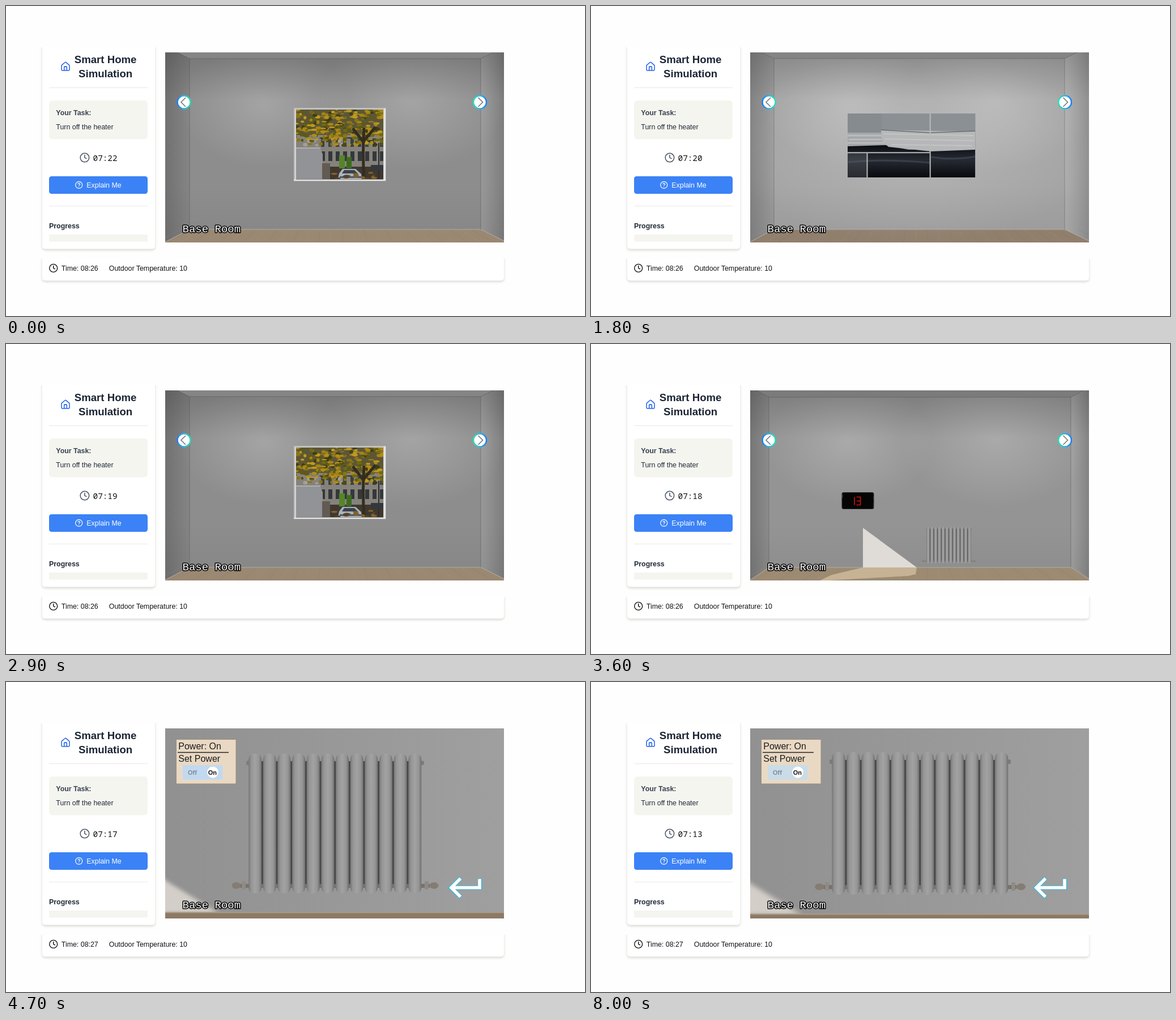
An HTML page that plays this animation: 1022 px wide and 548 px high, repeating every 8500 ms.

```html
<!DOCTYPE html>
<html lang="en">
<head>
<meta charset="utf-8">
<title>Smart Home Simulation</title>
<style>
html, body { margin: 0; height: 100%; overflow: hidden; background: #fefefe; }
#stage { display: block; width: 100vw; height: 100vh; font: 12.4px "Liberation Sans", Arial, sans-serif; }
.b { font-weight: bold; }
.mono { font-family: "Noto Sans Mono", monospace; font-size: 14.3px; }
.card { fill: #fff; filter: drop-shadow(0 2px 2px rgba(70, 65, 30, .22)); }
.soft { fill: #f5f5f0; }
.icon { fill: none; stroke-width: 2; stroke-linecap: round; stroke-linejoin: round; }
.line { fill: none; }
.label { font: 19px "Liberation Mono", "Courier New", monospace; fill: #fff; stroke: #000; stroke-width: 3px; stroke-linejoin: round; paint-order: stroke; }
.panel { font-size: 16px; fill: #1b1b1b; }
.tiny { font-size: 11px; font-weight: bold; }
</style>
</head>
<body>
<svg id="stage" viewBox="0 0 1022 548" preserveAspectRatio="none">
  <defs>
    <linearGradient id="ring"><stop stop-color="#1f7df0"/><stop offset=".5" stop-color="#2cb8e8"/><stop offset="1" stop-color="#27e0b0"/></linearGradient>
    <linearGradient id="fin">
      <stop stop-color="#777"/><stop offset=".2" stop-color="#959595"/><stop offset=".5" stop-color="#a2a2a2"/>
      <stop offset=".8" stop-color="#959595"/><stop offset="1" stop-color="#707070"/>
    </linearGradient>
    <linearGradient id="leftShade"><stop stop-color="#000" stop-opacity=".2"/><stop offset="1" stop-color="#000" stop-opacity=".06"/></linearGradient>
    <linearGradient id="rightShade"><stop stop-color="#fff" stop-opacity=".1"/><stop offset="1" stop-color="#000" stop-opacity=".12"/></linearGradient>
    <linearGradient id="topShade" x2="0" y2="1"><stop stop-color="#000" stop-opacity=".16"/><stop offset=".25" stop-color="#000" stop-opacity="0"/><stop offset=".7" stop-color="#000" stop-opacity="0"/><stop offset="1" stop-color="#000" stop-opacity=".05"/></linearGradient>
    <linearGradient id="closeWall"><stop stop-color="#909090"/><stop offset="1" stop-color="#a0a0a0"/></linearGradient>
    <linearGradient id="night" x2="0" y2="1"><stop stop-color="#0b0d12"/><stop offset=".45" stop-color="#262b33"/><stop offset="1" stop-color="#08090d"/></linearGradient>
    <radialGradient id="glow"><stop stop-color="#fff" stop-opacity=".2"/><stop offset="1" stop-color="#fff" stop-opacity="0"/></radialGradient>
    <filter id="blur"><feGaussianBlur stdDeviation="4"/></filter>
    <filter id="haze"><feGaussianBlur stdDeviation=".7"/></filter>
    <g id="radiator"></g>
    <g id="nav">
      <circle r="11.5" fill="#fff" stroke="url(#ring)" stroke-width="2.4"/>
      <path d="M3-8l-8 8 8 8" class="line" stroke="#777" stroke-width="1.6"/>
    </g>
    <g id="clock"><circle cx="12" cy="12" r="10"/><path d="M12 6v6l4 2"/></g>
  </defs>

  <svg x="54" y="73" width="220" height="366" viewBox="54 73 220 366"><rect class="card" x="64" y="60" width="199" height="369.5" rx="5"/></svg>
  <svg x="54" y="447" width="836" height="50" viewBox="54 447 836 50"><rect class="card" x="64" y="430" width="815" height="55.5" rx="5"/></svg>

  <g class="icon" stroke="#2563eb" transform="translate(95.7 97.8) scale(.775)">
    <path d="M15 21v-8a1 1 0 0 0-1-1h-4a1 1 0 0 0-1 1v8M3 10a2 2 0 0 1 .709-1.528l7-6a2 2 0 0 1 2.582 0l7 6A2 2 0 0 1 21 10v9a2 2 0 0 1-2 2H5a2 2 0 0 1-2-2z"/>
  </g>
  <g class="b" font-size="18.6" fill="#1a2433" text-anchor="middle">
    <text x="175.6" y="101">Smart Home</text><text x="175.6" y="126">Simulation</text>
  </g>
  <path d="M76 144.5h174M76 353.5h174" stroke="#e8e8e8"/>
  <rect class="soft" x="76" y="167" width="174" height="68.5" rx="6"/>
  <text class="b" x="88.3" y="193" fill="#374151">Your Task:</text>
  <text x="88.3" y="218" fill="#1f2937">Turn off the heater</text>
  <use href="#clock" class="icon" stroke="#4b5563" transform="translate(129.6 258.8) scale(.775)"/>
  <text class="mono" id="timer" x="153.6" y="273.5" fill="#111"></text>
  <rect x="76" y="301" width="174" height="31" rx="4.5" fill="#3b82f6"/>
  <g class="icon" stroke="#fff" transform="translate(121.5 309.2) scale(.6)">
    <circle cx="12" cy="12" r="10"/><path d="M9.09 9a3 3 0 0 1 5.83 1c0 2-3 3-3 3M12 17h.01"/>
  </g>
  <text x="142.3" y="321" fill="#fff">Explain Me</text>
  <text class="b" x="76" y="393" fill="#1f2937">Progress</text>
  <rect class="soft" x="76" y="404" width="174" height="12.5"/>
  <use href="#clock" class="icon" stroke="#111" transform="translate(75.3 455) scale(.7)"/>
  <text id="time" x="97.8" y="468" fill="#111"></text>
  <text x="181.8" y="468" fill="#111">Outdoor Temperature: 10</text>

  <svg x="281" y="82" width="598" height="336" viewBox="281 82 598 336">
    <g id="rooms"></g>
    <g id="arrows"><use href="#nav" x="314" y="170"/><use href="#nav" transform="translate(836.5 170) scale(-1 1)"/></g>
    <g id="close">
      <g id="zoom">
        <rect x="240" y="50" width="680" height="400" fill="url(#closeWall)"/>
        <path d="M240 325L281 356L372 412H240z" fill="#d3cec8" filter="url(#blur)"/>
        <path d="M240 410h680v60h-680z" fill="#8c7a66"/>
        <path d="M240 410.5h680" stroke="#ab9b86" stroke-width="2"/>
        <use href="#radiator"/>
      </g>
      <rect x="300.5" y="101.5" width="105.5" height="78.5" fill="#e9d9c4" stroke="#9b8f80"/>
      <text class="panel" id="power" x="304.3" y="119"></text>
      <path d="M303 124.5h90" stroke="#222" stroke-width="1.3"/>
      <text class="panel" x="304.3" y="141">Set Power</text>
      <rect id="track" x="312" y="147" width="70.5" height="25.5" rx="2"/>
      <circle id="knob" cy="159.5" r="10" fill="#fff"/>
      <text class="tiny" id="off" x="321" y="163.5">Off</text>
      <text class="tiny" id="on" x="356.7" y="163.5">On</text>
      <g class="line">
        <path d="M803 346.5l-17.5 17 17.5 17M786 363.5h50.500v-16" stroke="#35b8dc" stroke-width="7.6"/>
        <path d="M802.300 347.300l-16.300 16.200 16.300 16.200M786 363.500h50v-15.200" stroke="#fff" stroke-width="5.6"/>
      </g>
    </g>
    <text class="label" x="311.500" y="400">Base Room</text>
  </svg>
</svg>
<script>
const LOOP = 8500;
const $ = id => document.getElementById(id);
const repeat = (n, f) => Array.from({ length: n }, (_, i) => f(i)).join('');
const box = (x, y, w, h, fill, extra = '') => `<rect x="${x}" y="${y}" width="${w}" height="${h}" fill="${fill}" ${extra}/>`;
const poly = (points, fill) => `<polygon points="${points}" fill="${fill}"/>`;
const path = (d, stroke, width = 1) => `<path d="${d}" class="line" stroke="${stroke}" stroke-width="${width}"/>`;
const glow = (x, y, rx, ry) => `<ellipse cx="${x}" cy="${y}" rx="${rx}" ry="${ry}" fill="url(#glow)"/>`;

let seed = 7;
const rand = (a, b) => {
  seed = seed * 16807 % 2147483647;
  return a + (b - a) * seed / 2147483647;
};

$('radiator').innerHTML =
  box(421, 137, 320, 8, '#7b7b7b', 'rx="3"') +
  box(428, 138, 306, 228, '#484848') +
  box(410, 359, 341, 7, '#77716b') +
  [403, 759].map(x => `<ellipse cx="${x}" cy="362" rx="8" ry="6" fill="#857d74"/>` + box(x < 500 ? 413 : 742, 354, 7, 15, '#8f8a85', 'rx="2"')).join('') +
  repeat(12, i => box(425.2 + i * 26.15, 124, 23.4, 252, 'url(#fin)', 'rx="10"'));

function room(id, l, r, top, wall, ceiling, floor, inner) {
  const planks = repeat(34, i => {
    const x = 270 + i * 19;
    return path(`M${x} 395L${x + (x - 580) * .16} 418`, i % 2 ? '#6a5846' : '#c4b096', .6);
  });
  return `<g id="${id}">` +
    box(281, 82, 598, 336, wall) +
    glow(455, 175, 150, 110) + glow(715, 170, 170, 120) +
    box(281, 82, 598, 336, 'url(#topShade)') +
    poly(`${l - 22},82 ${r + 22},82 ${r},${top} ${l},${top}`, ceiling) +
    poly(`281,82 ${l - 22},82 ${l},${top} ${l},395 281,417`, 'url(#leftShade)') +
    poly(`879,82 ${r + 22},82 ${r},${top} ${r},395 879,415`, 'url(#rightShade)') +
    poly(`281,418 281,417 ${l},395 ${r},395 879,415 879,418`, floor) +
    `<g opacity=".2">${planks}</g>` +
    path(`M281 417L${l} 395H${r}L879 415`, '#b9b5ae', .8) +
    path(`M${l - 22} 82L${l} ${top}V395M${r + 22} 82L${r} ${top}V395M${l} ${top}H${r}`, 'rgba(60,60,60,.35)', 1) +
    inner + '</g>';
}

function leaves(n, x0, x1, y0, y1, colors) {
  return repeat(n, () => `<ellipse cx="${rand(x0, x1).toFixed(1)}" cy="${rand(y0, y1).toFixed(1)}" rx="${rand(2, 6).toFixed(1)}" ry="${rand(1, 3.5).toFixed(1)}" fill="${colors[Math.floor(rand(0, colors.length))]}"/>`);
}

const gold = ['#a88415', '#8a7418', '#c09a22', '#5d5a14', '#6e6a16', '#3c3d12', '#b08c1a'];
const view =
  box(508, 180, 162, 129, '#d4d4d4') + path('M509 309V181H669', '#bcbcbc', 2) + path('M508 308H669V181', '#e6e6e6', 2.5) +
  `<svg x="512" y="183" width="154" height="123.5" viewBox="512 183 154 123.5"><g filter="url(#haze)">` +
  box(505, 178, 170, 135, '#5c5636') +
  box(505, 228, 170, 62, '#85827c') +
  repeat(9, i => box(556 + i * 13, 234, 6, 15, '#3c4043') + box(556 + i * 13, 257, 7, 17, '#34383b')) +
  box(505, 284, 170, 30, '#40382f') +
  leaves(130, 510, 590, 183, 236, gold) +
  leaves(150, 582, 668, 183, 246, gold) +
  leaves(22, 515, 600, 236, 248, ['#8a7418', '#4b4a18', '#a3a09a']) +
  box(588, 264, 10, 23, '#55852a') + box(601, 267, 9, 20, '#3e6b1f') +
  path('M632 306Q629 260 632 215M632 242L612 216M632 238L652 214', '#332c20', 5) +
  path('M658 306V242', '#2c2d2c', 2) +
  poly('512,250 555,252 559,262 559,306 512,306', '#929396') + path('M512 251H555', '#bbbcbd', 1.5) +
  box(558, 278, 14, 28, '#625b54') +
  poly('586,306 588,296 594,288 617,288 627,297 628,306', '#aab3bf') +
  poly('593,296 597,290 615,290 621,296', '#38434e') + box(589, 301, 38, 3, '#4d5867') +
  box(644, 281, 24, 10, '#33383d') + leaves(14, 570, 666, 294, 306, ['#80622a', '#55442a']) +
  '</g></svg>';

const painting =
  box(453, 190, 225.5, 113, '#8b9095') +
  box(453, 190, 60, 33, '#868b90') +
  box(453, 224, 225, 26, '#a4a7a9') +
  path('M453 229H520M455 236H512M453 242H530', '#bbbdbe', 3) +
  poly('453,248 520,246 560,254 678,254 678,303 453,303', 'url(#night)') +
  poly('512,219 678,222 678,254 600,257 525,249 513,238', '#b5b7b8') +
  path('M516 226L676 229M518 235L676 238M530 245L672 247', '#c3c5c5', 2) +
  path('M512 219L598 224L678 221', '#696d70', 1.5) +
  path('M453 276Q520 270 598 277M600 267Q640 273 678 266', 'rgba(90,98,110,.4)', 3) +
  box(453, 260, 34, 43, 'rgba(100,105,110,.35)') +
  path('M598.700 190V303M453 259.300H598M487.500 259V303', '#b9b9b9', 2);

const heater =
  poly('480,325 480,395 575,395', '#dfdcd8') +
  poly('480,395 575,395 573,407 560,410 420,418 404,418 425,408', '#c6b294') +
  box(443, 262.5, 56, 29, '#050505', 'rx="2.5" stroke="#2c2c2c"') +
  path('M499 268v7M499 280v8M444 266v6', '#555', 1) +
  path('M465 270.500V284.500M468.500 270.500H475.500V284.500H468.500M469 277.500H475', '#d8100c', 1.6) +
  '<g id="heater"><use href="#radiator" transform="translate(484.100 291.800) scale(.254)"/></g>';

$('rooms').innerHTML =
  room('window', 324, 838, 93, '#8d8d8d', '#858585', '#9a8872', view) +
  room('heaterWall', 314, 847, 94, '#949494', '#7b7b7b', '#9c8a72', heater) +
  room('art', 323, 836, 93, '#a3a3a3', '#848484', '#917f6d', glow(570, 250, 330, 170) + painting) +
  room('bare', 323, 837, 93, '#999', '#828282', '#958370', '');

const views = [[0, 'window'], [1200, 'heaterWall'], [1800, 'art'], [2300, 'bare'], [2900, 'window'], [3500, 'heaterWall'], [4600, 'close']];
const ticks = [700, 1600, 2600, 3600, 4300, 5300, 6200, 7100, 8000];
const clamp = v => Math.max(0, Math.min(1, v));
const show = (id, on) => $(id).style.display = on ? '' : 'none';
// progress in held steps of 100 ms
const steps = (t, start, n) => clamp((Math.floor((t - start) / 100) + 1) / n);

function draw(t) {
  const current = views.filter(v => v[0] <= t).pop()[1];
  for (const id of new Set(views.map(v => v[1]))) show(id, id === current);
  show('arrows', current !== 'close');

  $('timer').textContent = '07:' + (22 - ticks.filter(k => k <= t).length);
  $('time').textContent = 'Time: 08:' + (t < 4300 ? 26 : 27);
  $('heater').style.filter = `brightness(${t < 4400 ? 1 : .66})`;

  const k = Math.max(0, Math.floor((t - 4600) / 100));
  const scale = k > 2 ? 1 : 1 - .06 * .32 ** k;
  $('zoom').setAttribute('transform', `translate(580 250) scale(${scale}) translate(-580 -250)`);

  const off = t < 5900 ? steps(t, 5500, 3) : 1 - steps(t, 5900, 3);
  $('power').textContent = 'Power: ' + (t >= 5500 && t < 5900 ? 'Off' : 'On');
  $('knob').setAttribute('cx', 365 - 36 * off);
  const base = t < 5500 ? [193, 217, 241] : [201, 220, 232];
  $('track').setAttribute('fill', `rgb(${base.map((c, i) => c + ([214, 219, 221][i] - c) * off)})`);
  $('on').setAttribute('fill', off < .5 ? '#111' : '#858b92');
  $('off').setAttribute('fill', off < .5 ? '#858b92' : '#111');
}

const start = performance.now();
function frame() {
  draw((performance.now() - start) % LOOP);
  requestAnimationFrame(frame);
}
frame();
</script>
</body>
</html>
```
